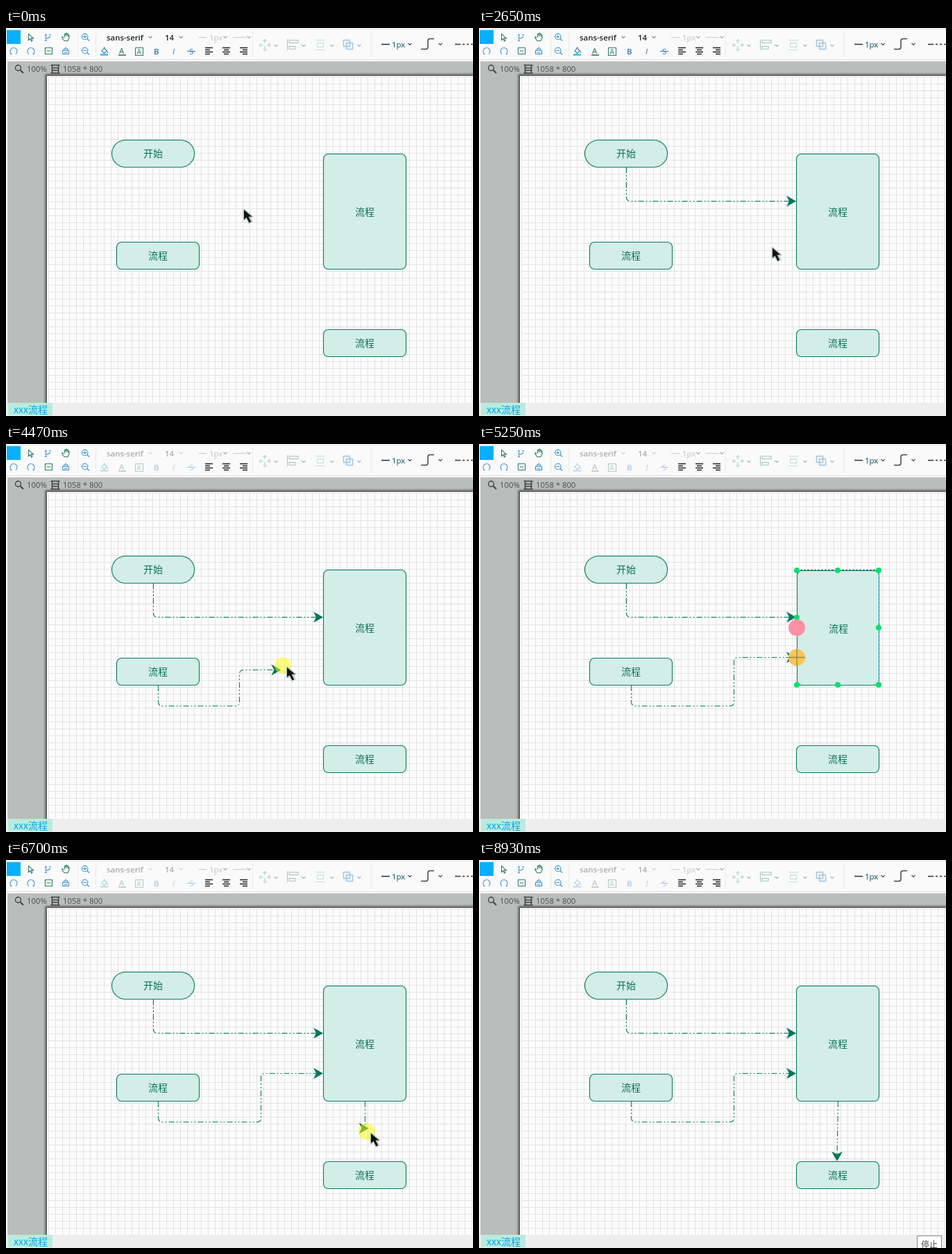
Write an HTML page that moves like this. It is 673 px wide and 559 px high and loops after 9000 ms.

```html
<!DOCTYPE html>
<html lang="zh">
<head>
<meta charset="utf-8">
<title>Flowchart editor</title>
<style>
html, body { margin: 0; width: 100%; height: 100%; overflow: hidden; background: #fff; }
svg { display: block; width: 673px; height: 559px; }
text { font-family: "Open Sans", "Noto Sans", sans-serif; }
.cjk { font-family: "Noto Sans CJK SC", "Noto Sans CJK", sans-serif; }
.icon { fill: none; stroke-width: 1.1; }
</style>
</head>
<body>
<svg viewBox="0 0 673 559" xmlns="http://www.w3.org/2000/svg">
  <defs>
    <pattern id="grid" x="61" y="70" width="10" height="10" patternUnits="userSpaceOnUse">
      <path d="M.5 0V10M0 .5H10" stroke="#e2e2e2" fill="none"/>
    </pattern>
    <filter id="soft"><feGaussianBlur stdDeviation="1.4"/></filter>
  </defs>
  <rect x="1" y="1" width="672" height="45" fill="#fafafa"/>
  <path d="M0 1.5H673M0 45.5H673" stroke="#dedede"/>
  <path d="M103.5 4V42M129.5 4V42M355.5 4V42M526.5 4V42" stroke="#e9e9e9"/>
  <g id="bar"></g>
  <g id="format"></g>

  <rect x="2" y="48" width="671" height="492" fill="#b9bdbc"/>
  <rect x="58" y="68" width="640" height="500" fill="#444" stroke="#555" stroke-width="3" filter="url(#soft)"/>
  <rect x="59" y="69" width="614" height="471" fill="#fdfdfd"/>
  <rect x="61" y="70" width="612" height="470" fill="url(#grid)"/>
  <g class="icon" stroke="#444">
    <circle cx="17.5" cy="57.5" r="4" stroke-width="1.4"/><path d="M20.5 60.5L25 65" stroke-width="2"/>
    <path d="M64.500 53.5H77.500M64.500 65H77.500M66.500 54V65M75.500 54V65M67 57.500H75M67 61H75" stroke-width="1.7"/>
  </g>
  <g fill="#4c4c4c" font-size="11.3"><text x="30" y="63">100%</text><text x="82" y="63">1058 * 800</text></g>

  <g id="scene"></g>

  <rect y="540" width="673" height="19" fill="#eee"/>
  <rect x="3" y="540" width="64" height="18" fill="#b8ecdc"/>
  <text class="cjk" x="11" y="555" font-size="14" font-weight="500" fill="#00a2ff">xxx流程</text>
  <g id="top"></g>
</svg>
<script>
const LOOP = 9000, INK = '#087a61';
const el = id => document.getElementById(id);

// ---- toolbar ----
const icon = (d, color, extra = '') => `<path class="icon" d="${d}" stroke="${color}" ${extra}/>`;
const chevron = (x, y, color = '#888') => icon(`M${x - 2.5} ${y - 1.5}l2.5 2.500l2.500-2.500`, color);
const label = (x, y, s, color, extra = '') =>
  `<text x="${x}" y="${y}" font-size="11.4" fill="${color}" ${extra}>${s}</text>`;
const lens = (y, plus) =>
  icon(`M109.500 ${y}a4.200 4.200 0 1 0 8.400 0a4.200 4.200 0 1 0-8.400 0M117 ${y + 3}l3 3M111.500 ${y}h4.400${plus ? 'm-2.200-2.200v4.400' : ''}`, '#2f8fc9');
const lines = (x, shift) =>
  icon([11, 7, 11, 7].map((w, i) => `M${x + (11 - w) * shift} ${28.5 + i * 3}h${w}`).join(''), '#222', 'style="stroke-width:1.3"');

const GREEN = '#2f7d6c', BLUE = '#3f8fcd', PALE = '#c3dfd4';
el('bar').innerHTML = [
  '<rect x="1" y="3" width="20" height="20" fill="#06b0fa"/>',
  icon('M32.500 8.500v9l2.300-2l1.700 3.500l1.500-.8l-1.600-3.300h3z', GREEN),
  icon('M57.500 10v8M57.500 15q6 0 6-4M56 9.500h3M56 18.500h3M62 9.500h3', BLUE),
  icon('M83 14l-2-1.500v2l3 4h5l2-4v-4l-1.500 0v2v-4h-1.700v3v-4h-1.700v4v-3h-1.700v5', GREEN),
  lens(12.5, true), lens(32.5, false),
  icon('M8 37.500a5 5 0 1 1 6 0M6 37.500h2.500', BLUE),
  icon('M33 37.500a5 5 0 1 1 6 0M38.500 37.500h2.500', BLUE),
  icon('M56.500 28.500h10v9h-10zM58.500 33h6', GREEN),
  icon('M81.500 32.500h9v5h-9zM83.500 32v-2h5v2M86 30v-3M83.500 35.500h5', BLUE),
  icon('M277 13.500h12M327 13.500h19', '#c5cdca'),
  label(293, 18, '1px', '#bcc3c8'), chevron(316, 13.5, '#aaa'), chevron(350, 13.5, '#aaa'),
  lines(287, 0), lines(312, .5), lines(337, 1),
  icon('M373 17v5M373 26v6M365.500 24.500h5M376 24.500h5M370.500 19l2.500-2.500l2.500 2.500M370.500 30l2.500 2.500l2.500-2.500M368 22l-2.500 2.500l2.500 2.500M378.500 22l2.500 2.500l-2.500 2.500', PALE, 'style="stroke-width:1.6"'),
  icon('M405.500 16v16M408 17.500h13v4h-13zM408 26.500h9v4h-9z', '#a9c8bc'),
  icon('M446 17.500h14M446 31.500h14M448.500 21.500h9v6h-9z', PALE),
  icon('M486.500 17.500h9v9h-9zM490.500 21.500h9v9h-9z', '#9cc5e6', 'style="stroke-width:1.5"'),
  ...[389, 429, 470, 509].map(x => chevron(x, 25.5, '#b0b0b0')),
  icon('M541 23.500h12', '#333', 'style="stroke-width:1.5"'),
  label(556, 28, '1px', '#0c4f68'), chevron(582, 23.5, '#444'),
  icon('M598 30.500h7q3 0 3-3v-9q0-3 3-3h6', '#444', 'style="stroke-width:1.5"'), chevron(626, 23.5, '#444'),
  icon('M647 23.500h26', '#333', 'style="stroke-width:1.5" stroke-dasharray="8 3 3 3 3 3"')
].join('');

el('format').innerHTML = [
  label(145, 18, 'sans-serif', '#222', 'font-weight="600"'), chevron(208, 13.5),
  label(229, 18, '14', '#222', 'font-weight="600"'), chevron(252, 13.5),
  icon('M138 33l3.500-4l4 4l-4 3.500zM141.500 29v-2M146.500 34v2', '#2b7bb0'),
  '<path d="M136 38.500h11" stroke="#08a8f0" stroke-width="2"/>',
  label(163, 37, 'A', '#1d6a55'), '<path d="M162 39h11" stroke="#1d6a55" stroke-width="1.500"/>',
  icon('M186.500 28.500h11v11h-11z', GREEN), label(188.5, 38, 'A', GREEN, 'style="font-size:10px"'),
  label(213, 38, 'B', '#2a78b4', 'font-weight="600"'),
  label(240, 38, 'I', '#2a78b4', 'font-style="italic"'),
  label(264, 38, 'S', '#2a78b4'), icon('M261 33.500h12', '#2a78b4')
].join('');

// ---- diagram ----
const nodes = [
  { x: 152, y: 161, h: 40, r: 20, name: '开始' },
  { x: 159, y: 308, h: 40, r: 7, name: '流程' },
  { x: 457, y: 181, h: 167, r: 7, name: '流程' },
  { x: 457, y: 434, h: 40, r: 7, name: '流程' }
];
const W = 120;

// Each link is dragged from `start`, snaps to its end at `snap`, stays afterwards.
const links = [
  { from: [212.5, 201], to: [457, 249.5], start: 1170, snap: 1710, drop: 1980 },
  { from: [219.5, 348], to: [457, 307.5], start: 3560, snap: 4990, drop: 5510 },
  { from: [517.5, 348], to: [516, 434], start: 6570, snap: 6960, drop: 7350, down: true }
];

// Node highlighted while the pointer sits on one of its anchors.
const hovers = [
  { t: [780, 1040], node: 0, at: [212, 202] },
  { t: [1980, 2390], node: 2, at: [458, 250] },
  { t: [3170, 3560], node: 1, at: [219, 349] },
  { t: [5120, 5640], node: 2, at: [458, 307.5], joint: 250 },
  { t: [6310, 6570], node: 2, at: [517, 348] },
  { t: [6960, 7350], node: 3, at: [517, 435] }
];

const pointerPath = [
  [0, 343, 262], [650, 218, 208], [910, 212, 202], [1040, 212, 202], [1170, 262, 249],
  [1300, 337, 250], [1560, 447, 249], [1710, 457, 249], [2260, 457, 249], [2650, 423, 317],
  [3170, 222, 352], [3430, 219, 348], [3560, 219, 352], [3690, 233, 380], [4080, 330, 352],
  [4600, 430, 312], [4990, 458, 307], [5640, 458, 307], [6310, 517, 348], [6440, 517, 348],
  [6570, 516, 372], [6700, 526, 394], [6960, 517, 434], [7480, 517, 436], [8410, 619, 545], [8600, 645, 565]
];

function pointerAt(t) {
  const i = pointerPath.findIndex(p => p[0] > t);
  if (i < 0) return pointerPath.at(-1).slice(1);
  const [t0, x0, y0] = pointerPath[i - 1], [t1, x1, y1] = pointerPath[i];
  const k = (t - t0) / (t1 - t0);
  return [x0 + (x1 - x0) * k, y0 + (y1 - y0) * k];
}

const during = (t, a, b) => t >= a && t < b;
const dot = ([x, y], r, fill, extra = '') => `<circle cx="${x}" cy="${y}" r="${r}" fill="${fill}" ${extra}/>`;

function drawNode({ x, y, h, r, name }, shift) {
  const d = shift ? 1 : 0;
  return `<rect x="${x + .5 + d}" y="${y + .5 + d}" width="${W - 1 - d}" height="${h - 1 - d}" rx="${r}" fill="#d3eee6" stroke="${INK}" stroke-width="1.1"/>
    <text class="cjk" x="${x + W / 2 + d}" y="${y + h / 2 + 5 + d}" font-size="14" text-anchor="middle" fill="#0b705a">${name}</text>`;
}

function roundedPath(pts) {
  let d = `M${pts[0]}`;
  for (let i = 1; i < pts.length - 1; i++) {
    const [x, y] = pts[i];
    const towards = ([a, b]) => {
      const len = Math.hypot(a - x, b - y) || 1, k = Math.min(6, len / 2) / len;
      return [x + (a - x) * k, y + (b - y) * k];
    };
    d += `L${towards(pts[i - 1])}Q${x},${y} ${towards(pts[i + 1])}`;
  }
  return d + `L${pts.at(-1)}`;
}

function drawLink(link, t) {
  if (t < link.start) return '';
  const snapped = t >= link.snap, [x0, y0] = link.from;
  const [x, y] = snapped ? link.to : pointerAt(t - 45);
  let pts, turn = 0;
  if (snapped && link.down) {
    pts = [[x0, y0], [x, y - 10]];
    turn = 90;
  } else if (x - x0 < 14) {
    pts = [[x0, y0], [x0, y]];
  } else if (y > y0) {
    pts = [[x0, y0], [x0, y], [x - 10, y]];
  } else {
    const mid = Math.floor((279 + x) / 2) - .5, low = y0 + 29.5;
    pts = [[x0, y0], [x0, low], [mid, low], [mid, y], [x - 10, y]];
  }
  return `<path d="${roundedPath(pts)}" fill="none" stroke="${INK}" stroke-width="1.1" stroke-dasharray="8 3 2 3 2 3"/>
    <path d="M0 0L-14-8L-10 0L-14 8Z" fill="#08745a" transform="translate(${x} ${y}) rotate(${turn})"/>`;
}

function drawHover({ node, at, joint }) {
  const n = nodes[node], x = n.x + 1, y = n.y + 1, r = x + W - 2, b = y + n.h - 2;
  const cx = (x + r) / 2, cy = (y + b) / 2, onLeft = at[0] === x;
  const handles = [[x, y], [cx, y], [r, y], [r, cy], [r, b], [cx, b], [x, b], [x, cy]];
  if (joint) handles.push([x, joint]);
  return `<path d="M${r} ${y - .5}H${x + .5}V${b + .5}H${r}" fill="none" stroke="#1d7d74" stroke-dasharray="3 2"/>
    <path d="M${r + .5} ${y}V${b}" stroke="#1698f0" stroke-dasharray="4 2"/>`
    + handles.map(p => dot(p, 4, '#06df6e')).join('')
    + (onLeft ? dot([x, cy], 12, '#fc90a6') : '') + dot(at, 12, '#fc90a6');
}

const arrow = ([x, y]) => `<g transform="translate(${x} ${y}) scale(.88)">
  <path d="M0 0V16L4 12.500L8.500 21L12.500 19L8.500 11H13.500Z" fill="#7b8e86" stroke="#b4c3bc" stroke-width="3.500" stroke-linejoin="round" opacity=".8"/>
  <path d="M0 0V16L4 12.500L8.500 21L11.500 19.500L7.500 11H13Z" fill="#0b1512"/></g>`;
const cross = ([x, y]) =>
  `<path d="M${x - 12} ${y}h24M${x} ${y - 12}v24" stroke="#6d8040" stroke-width="1.300" opacity=".8"/>`;

function draw(t) {
  const hover = hovers.find(h => during(t, ...h.t));
  const pressed = links.some(l => during(t, l.start - 130, l.drop));
  const pos = pointerAt(t);
  el('format').setAttribute('opacity', t < 2910 ? 1 : .36);
  el('scene').innerHTML = nodes.map((n, i) => drawNode(n, hover?.node === i)).join('')
    + links.map(l => drawLink(l, t)).join('') + (hover ? drawHover(hover) : '');

  const halo = hover ? hover.at : [pos[0] - 6, pos[1] - 3];
  let top = pressed ? dot(halo, 12, '#fff900', 'opacity=".5"') : '';
  if (t < 8600) top += hover ? cross(hover.at) : arrow(pos);
  else top += `<rect x="631.500" y="541.500" width="35" height="24" fill="#fff" stroke="#8a8a8a"/>
    <text class="cjk" x="637" y="559" font-size="12" fill="#444">停止</text>`;
  el('top').innerHTML = top;
}

// ---- clock: the picture advances in steps of about 130 ms ----
const runs = [[0, 13], [1710, 1], [1830, 1], [1980, 3], [2390, 26], [5790, 14], [7630, 11]];
const starts = runs.flatMap(([t, n]) => Array.from({ length: n }, (_, i) => t + 130 * i));
const origin = performance.now();
let shown = -1;
function tick() {
  const t = Math.max(0, performance.now() - origin) % LOOP;
  const step = starts.findLast(s => s <= t);
  if (step !== shown) draw(shown = step);
  requestAnimationFrame(tick);
}
tick();
</script>
</body>
</html>
```
